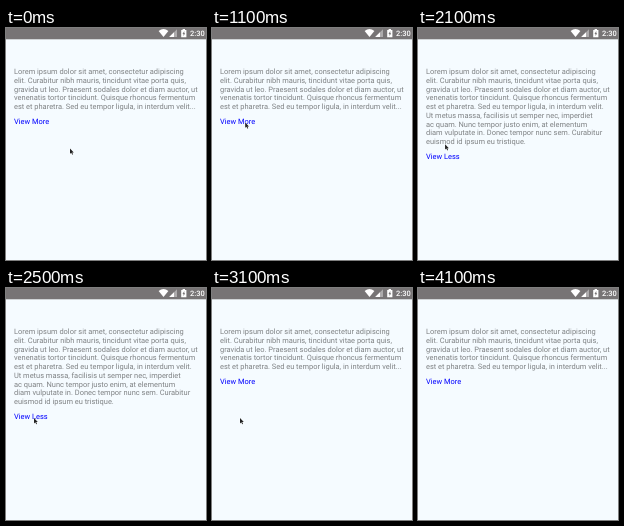
Recreate the animation shown at these times as an HTML page. Size 200 by 232 pixels, loop 4.7 s.

```html
<!DOCTYPE html>
<html lang="en">
<head>
<meta charset="utf-8">
<title>View more</title>
<style>
html, body { margin: 0; width: 100%; height: 100%; overflow: hidden; background: #f5fbff; }
svg { display: block; width: 200px; height: 232px; }
text { font: 7.46px Roboto, sans-serif; text-rendering: geometricPrecision; }
</style>
</head>
<body>
<svg viewBox="0 0 200 232">
  <rect width="200" height="232" fill="#f5fbff"/>
  <rect width="200" height="11.3" fill="#777475"/>
  <g fill="#fff">
    <path d="M152.6 2.9Q157.5-.7 162.4 2.9L157.5 9Z"/>
    <path d="M163.2 9L171 1.2V9Z" opacity=".4"/>
    <path d="M163.2 9L168 4.2V9Z"/>
    <path d="M175.2 2H176.6V1H179V2H180.4V9.2H175.2Z"/>
    <path d="M178.3 3.1L176.5 6H177.5V8.1L179.2 5.2H178.3Z" fill="#777475"/>
    <text x="184" y="8.1" style="font-weight:500">2:30</text>
  </g>
  <g id="body" fill="#7f8284"></g>
  <text id="link" x="8" fill="#00f"></text>
  <path id="cursor" d="M0 0V5.4L1.3 4.3L2.2 6.3L3 5.9L2.2 4H3.8Z"
        fill="#222" stroke="#fff" stroke-width=".5" paint-order="stroke"/>
</svg>
<script>
const LOOP = 4700, STEP = 100, LINE = 8.75, TOP = 46;
const lines = [
  'Lorem ipsum dolor sit amet, consectetur adipiscing',
  'elit. Curabitur nibh mauris, tincidunt vitae porta quis,',
  'gravida ut leo. Praesent sodales dolor et diam auctor, ut',
  'venenatis tortor tincidunt. Quisque rhoncus fermentum',
  'est et pharetra. Sed eu tempor ligula, in interdum velit',
  'Ut metus massa, facilisis ut semper nec, imperdiet',
  'ac quam. Nunc tempor justo enim, at elementum',
  'diam vulputate in. Donec tempor nunc sem. Curabitur',
  'euismod id ipsum eu tristique.'
];
// Pointer path: time, x, y
const path = [
  [0, 64, 120.4], [100, 58, 115], [200, 46, 105], [300, 37, 98.3], [500, 34, 95.5],
  [600, 32.6, 94.8], [700, 33.2, 94.4], [1700, 33.2, 94.4], [2300, 24, 127],
  [2400, 26, 128.5], [2500, 28, 130], [3800, 28, 130], [4000, 54, 188.5]
];
const $ = id => document.getElementById(id);

const rows = lines.map((line, i) => {
  const row = document.createElementNS('http://www.w3.org/2000/svg', 'text');
  row.setAttribute('x', 8);
  row.setAttribute('y', TOP + i * LINE);
  row.textContent = line;
  return $('body').appendChild(row);
});

function pointer(t) {
  const i = path.findIndex(p => p[0] > t);
  if (i < 0) return path[path.length - 1].slice(1);
  const [a, b] = [path[i - 1], path[i]];
  const k = (t - a[0]) / (b[0] - a[0]);
  return [1, 2].map(j => a[j] + (b[j] - a[j]) * k);
}

function draw(now) {
  const t = Math.floor((now % LOOP) / STEP) * STEP;
  const open = t >= 1400 && t < 3100;
  rows.forEach((row, i) => row.setAttribute('visibility', open || i < 5 ? 'visible' : 'hidden'));
  rows[4].textContent = lines[4] + (open ? '.' : '...');
  $('link').textContent = open ? 'View Less' : 'View More';
  $('link').setAttribute('y', 96.4 + (open ? 4 * LINE : 0));
  $('cursor').setAttribute('transform', `translate(${pointer(t)})`);
  $('cursor').setAttribute('visibility', t < 4100 ? 'visible' : 'hidden');
}

const start = performance.now();
function tick() {
  draw(performance.now() - start);
  requestAnimationFrame(tick);
}
tick();
</script>
</body>
</html>
```
